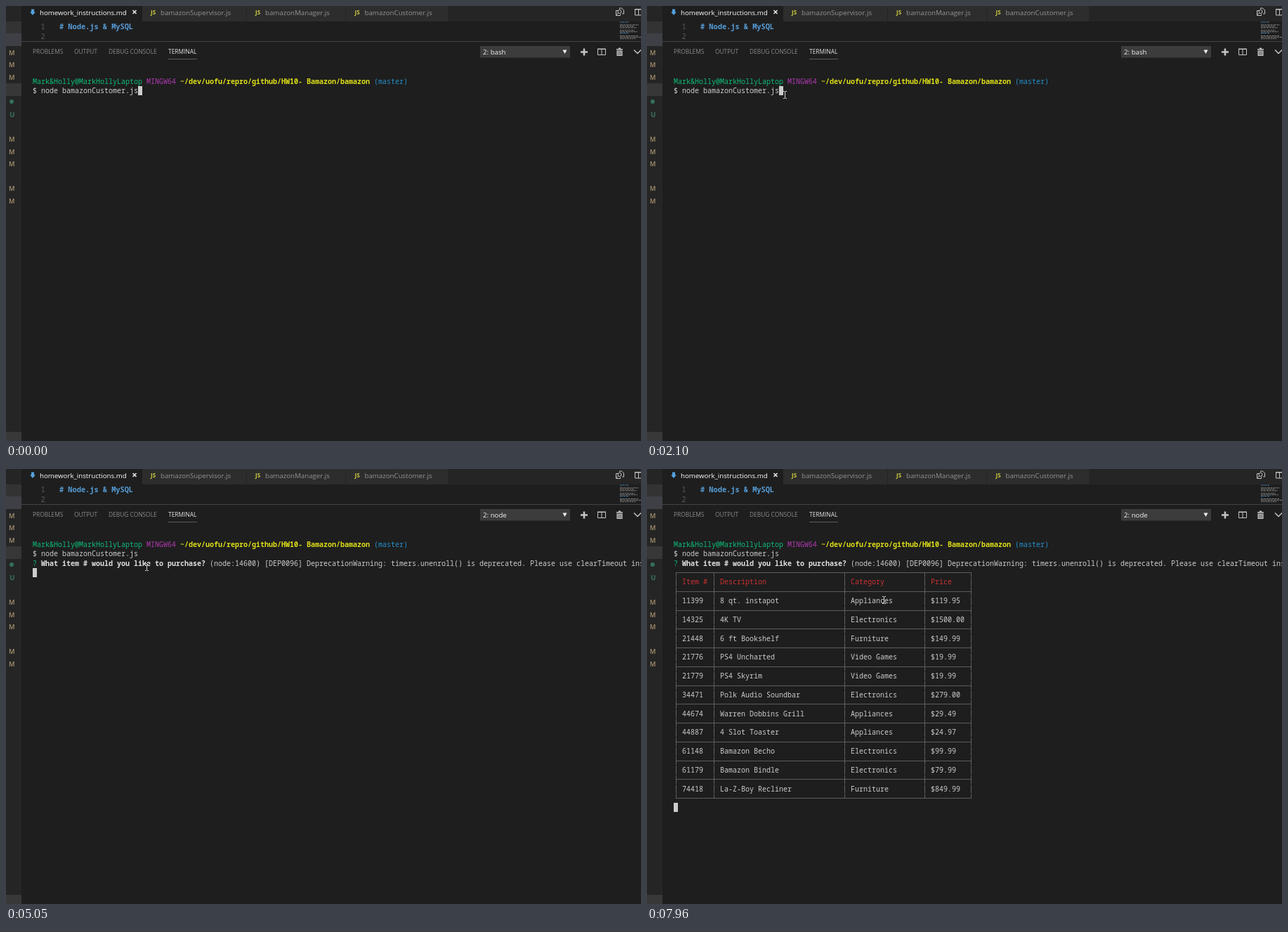
Recreate the animation shown at these times as an HTML page. Size 904 by 619 pixels, loop 8000 ms.

```html
<!DOCTYPE html>
<html lang="en">
<head>
<meta charset="utf-8">
<title>Terminal session</title>
<style>
  html, body { margin: 0; width: 100%; height: 100%; overflow: hidden; background: #1e1e1e; }
  svg { display: block; }
  #stage { position: absolute; left: 0; top: 0; }
  text { white-space: pre; font: 9.7px "Open Sans", "Noto Sans", sans-serif; fill: #ccc; }
  .mono text { font: 10px "Noto Sans Mono", "Liberation Mono", monospace; }
  .mono .b { font-weight: 700; }
  .mono .head { font-size: 10.3px; }
  .mono .num { font-size: 10.3px; fill: #5a5a5a; }
  .tab text { fill: #939393; }
  .tab .js { font-size: 8px; font-weight: 700; fill: #cbcb41; }
  .panel text { font-size: 8.4px; fill: #8b8b8b; }
  .git text { font-size: 9.2px; font-weight: 600; fill: #a58f6c; }
  .line { fill: none; stroke: #c5c5c5; }

  .anim { animation: 8s step-end -2ms infinite; }
  #bash { animation-name: bash; }
  #node { animation-name: node; }
  #ask { animation-name: ask; }
  #warn { animation-name: warn; }
  #list { animation-name: list; }
  #block { animation-name: block; }
  #beam { position: absolute; mix-blend-mode: difference; animation-name: beam; }

  @keyframes bash { 0% { opacity: 1 } 51.375%, to { opacity: 0 } }
  @keyframes node { 0% { opacity: 0 } 51.375%, to { opacity: 1 } }
  @keyframes ask { 0% { opacity: 0 } 62.125%, to { opacity: 1 } }
  @keyframes warn { 0% { opacity: 0 } 63.125%, to { opacity: 1 } }
  @keyframes list { 0% { opacity: 0 } 65.25%, to { opacity: 1 } }
  @keyframes block {
    0% { transform: translate(188px, 114px) }
    50.5% { transform: translate(38px, 128px) }
    62.125% { transform: translate(290px, 128px) }
    63.125% { transform: translate(38px, 141px) }
    65.25%, to { transform: translate(38px, 475px) }
  }
  @keyframes beam {
    0% { left: -20px; top: -20px }
    3.25% { left: 766px; top: 590px }
    4.1875% { left: 601px; top: 553px }
    5.125% { left: 603px; top: 554px }
    7.125% { left: 603px; top: 554px; animation-timing-function: steps(7, start) }
    13.6875% { left: 372px; top: 290px }
    15% { left: 372px; top: 290px; animation-timing-function: steps(7, start) }
    20.6875% { left: 254px; top: 183px; animation-timing-function: steps(6, start) }
    25.5625% { left: 195px; top: 123px }
    25.625% { left: 195px; top: 123px; animation-timing-function: steps(3, start) }
    27.875% { left: 191px; top: 118px }
    34.25% { left: 191px; top: 118px; animation-timing-function: steps(3, start) }
    36.5% { left: 198px; top: 134px }
    90.75% { left: 209px; top: 138px; animation-timing-function: steps(11, end) }
    99.5%, to { left: 335px; top: 181px }
  }
</style>
</head>
<body>
<svg id="stage" width="904" height="619" viewBox="0 0 904 619">
  <rect width="904" height="619" fill="#1e1e1e"/>

  <!-- side bar -->
  <rect width="22" height="619" fill="#252526"/>
  <rect y="22" width="22" height="17" fill="#333334"/>
  <rect y="39" width="22" height="18" fill="#3f3f46"/>
  <rect y="110" width="22" height="18" fill="#373738"/>
  <rect y="606" width="22" height="13" fill="#383838"/>
  <g id="git" class="git">
    <circle cx="8" cy="136" r="3" fill="#35705a"/>
    <text x="5.5" y="157.5" style="fill:#40926f">U</text>
  </g>

  <!-- tabs -->
  <rect x="194" width="710" height="22" fill="#252526"/>
  <g fill="#2d2d2d">
    <rect x="194" width="148" height="22"/>
    <rect x="343" width="140" height="22"/>
    <rect x="484" width="145" height="22"/>
  </g>
  <path d="M36 4.500h4v4h2l-4 4.500l-4-4.500h2z" fill="#55a0dc"/>
  <text x="48" y="12.700" style="fill:#fff">homework_instructions.md</text>
  <path class="line" d="M180.500 6l5 5m0-5l-5 5" stroke-width="1.500" style="stroke:#eee"/>
  <g id="tabs" class="tab"></g>
  <g class="line">
    <path d="M871.500 6.500h-3v7h6v-2m-1-7v-1.500h3l3 3v5h-2.500"/>
    <circle cx="873.500" cy="8" r="2.500"/>
    <path d="M871.500 10l-3 3"/>
    <path d="M904 4.500h-8.500v8.500h8.500M900.500 4v9M895 5h9"/>
  </g>

  <!-- editor -->
  <g class="mono">
    <text class="num" x="49.500" y="32.800">1</text>
    <text class="num" x="49.500" y="47.300">2</text>
    <text class="head b" x="76" y="32.800" style="fill:#569cd6"># Node.js &amp; MySQL</text>
  </g>
  <g id="map" fill="none"></g>
  <path d="M22 50.500h882" stroke="#434343"/>

  <!-- panel header -->
  <g class="panel">
    <text x="38" y="68.200">PROBLEMS</text>
    <text x="97" y="68.200">OUTPUT</text>
    <text x="146" y="68.200">DEBUG CONSOLE</text>
    <text x="231" y="68.200" style="fill:#e7e7e7">TERMINAL</text>
  </g>
  <path d="M231 75.500h41" stroke="#5c5c5c"/>
  <rect x="675" y="57" width="128" height="16.500" fill="#3c3c3c"/>
  <text id="bash" class="anim" x="679" y="69" style="fill:#f0f0f0">2: bash</text>
  <text id="node" class="anim" x="679" y="69" style="fill:#f0f0f0">2: node</text>
  <path d="M792.500 62.500h6l-3 5.500z" fill="#f0f0f0"/>
  <path class="line" d="M818 65.500h10m-5-5v10" stroke-width="2.500"/>
  <path class="line" d="M842.500 61.500h11v8h-11zM848 61v9M842 61h12"/>
  <path d="M869 61h3v-1.500h3v1.500h3v1.500h-9zM869.500 63.500h8v7.500h-8z" fill="#c5c5c5"/>
  <path d="M871.500 64.500v5.500m2-5.500v5.500m2-5.500v5.500" stroke="#1e1e1e" stroke-width=".7"/>
  <path class="line" d="M894 62.500l5 5l5-5" stroke-width="1.500"/>

  <!-- terminal -->
  <g class="mono">
    <text x="38" y="110.800" style="fill:#0dbc79">Mark&amp;Holly@MarkHollyLaptop</text>
    <text x="200" y="110.800" style="fill:#b03ab0">MINGW64</text>
    <text class="b" x="248" y="110.800" style="fill:#dede18">~/dev/uofu/repro/github/HW10- Bamazon/bamazon</text>
    <text x="524" y="110.800" style="fill:#2490cc">(master)</text>
    <text x="38" y="124.200">$ node bamazonCustomer.js</text>
    <g id="ask" class="anim">
      <text x="38" y="137.500" style="fill:#0dbc79">?</text>
      <text class="b" x="50" y="137.500" style="fill:#e0e0e0">What item # would you like to purchase?</text>
    </g>
    <text id="warn" class="anim" x="290" y="137.500">(node:14600) [DEP0096] DeprecationWarning: timers.unenroll() is deprecated. Please use clearTimeout instead.</text>
    <g id="list" class="anim"></g>
  </g>
  <rect id="block" class="anim" width="6" height="13" fill="#ccc"/>
</svg>

<svg id="beam" class="anim" width="5" height="11" viewBox="0 0 5 11">
  <path d="M0 0h2v1h1v-1h2v1h-2v9h2v1h-2v-1h-1v1h-2v-1h2v-9h-2z" fill="#f4f4f4"/>
</svg>

<script>
  const NS = 'http://www.w3.org/2000/svg';
  const add = (id, tag, attrs, content = '') => {
    const el = document.createElementNS(NS, tag);
    for (const key in attrs) el.setAttribute(key, attrs[key]);
    el.textContent = content;
    document.getElementById(id).append(el);
  };

  for (const y of [66, 83.5, 101, 189.5, 207, 224.5, 259.5, 277.5])
    add('git', 'text', { x: 4, y: y + 3.5 }, 'M');

  for (const [x, name] of [[220, 'Supervisor'], [369, 'Manager'], [510.5, 'Customer']]) {
    add('tabs', 'text', { class: 'js', x: x - 14, y: 11.7 }, 'JS');
    add('tabs', 'text', { x, y: 12.7 }, `bamazon${name}.js`);
  }

  // minimap: headings in blue, paragraphs as broken grey strokes
  for (let i = 0; i < 14; i++) {
    const heading = i === 0 || i === 8;
    const width = heading ? 12 : i % 4 === 1 ? 0 : 30 - (i * 7) % 11;
    add('map', 'path', {
      d: `M874 ${23 + i * 1.95}h${width}`,
      stroke: heading ? '#4a82ad' : '#858585',
      'stroke-dasharray': `${2 + i % 3} .8 3 1`
    });
  }

  const rows = [
    'Item #|Description|Category|Price',
    '11399|8 qt. instapot|Appliances|$119.95',
    '14325|4K TV|Electronics|$1500.00',
    '21448|6 ft Bookshelf|Furniture|$149.99',
    '21776|PS4 Uncharted|Video Games|$19.99',
    '21779|PS4 Skyrim|Video Games|$19.99',
    '34471|Polk Audio Soundbar|Electronics|$279.00',
    '44674|Warren Dobbins Grill|Appliances|$29.49',
    '44887|4 Slot Toaster|Appliances|$24.97',
    '61148|Bamazon Becho|Electronics|$99.99',
    '61179|Bamazon Bindle|Electronics|$79.99',
    '74418|La-Z-Boy Recliner|Furniture|$849.99'
  ];
  const PITCH = 13.375, TOP = 147.5;
  const bottom = TOP + rows.length * 2 * PITCH;
  const columns = [50, 104, 290, 404];

  for (let i = 0; i <= rows.length; i++)
    add('list', 'path', { d: `M41 ${Math.floor(TOP + i * 2 * PITCH) + .5}H462`, stroke: '#5c5c5c' });
  for (const x of [41.5, 95.5, 281.5, 395.5, 461.5])
    add('list', 'path', { d: `M${x} ${TOP}V${bottom}`, stroke: '#646060', 'stroke-dasharray': '12.375 1', 'stroke-dashoffset': 6 });
  rows.forEach((row, i) => row.split('|').forEach((cell, c) =>
    add('list', 'text', {
      x: columns[c],
      y: 110.8 + (4 + 2 * i) * PITCH,
      style: i ? '' : 'fill:#cd3131'
    }, cell)));
</script>
</body>
</html>
```
